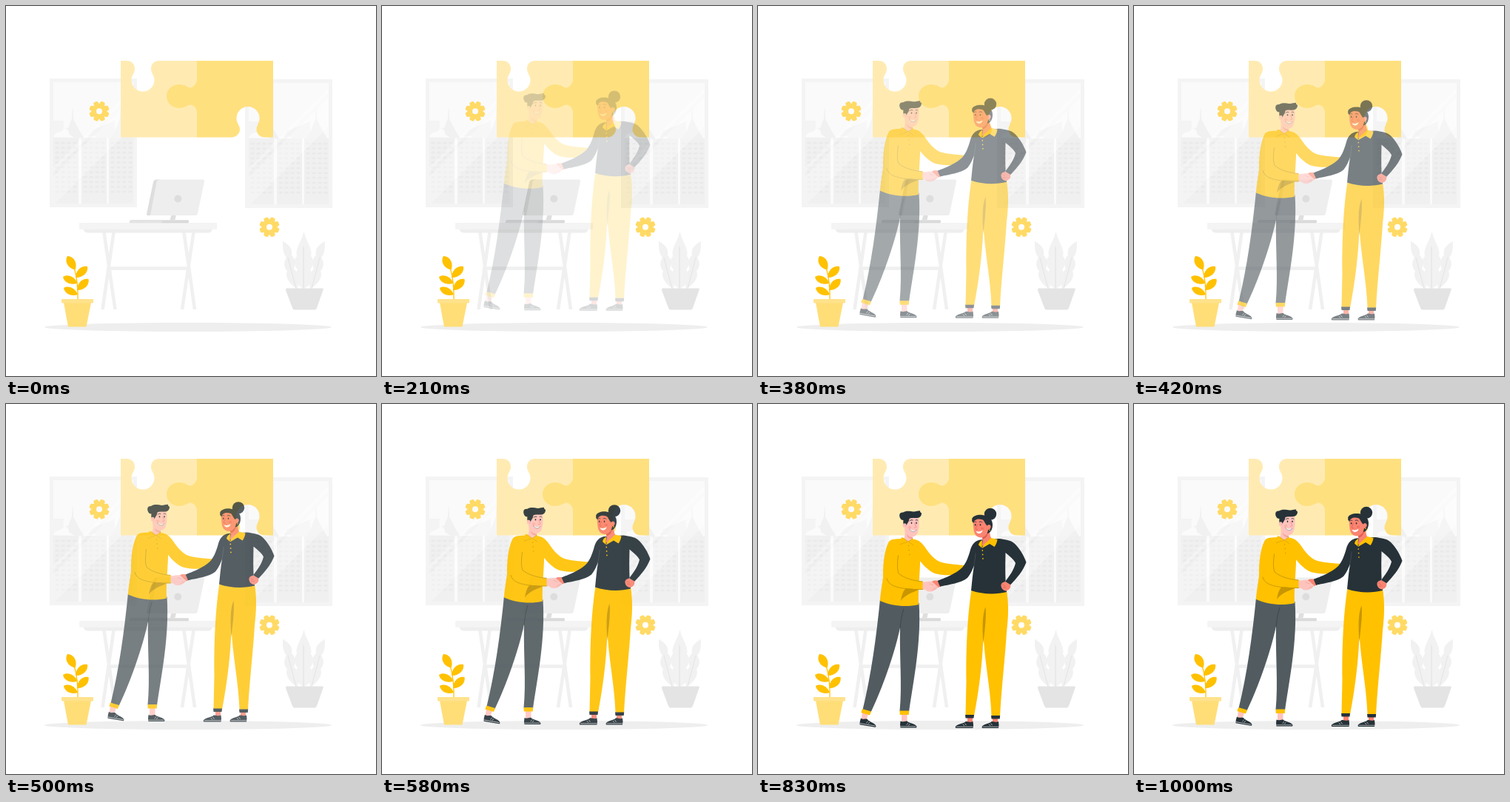
An HTML page with a canvas that plays this animation: 500 by 500 pixels, repeating every 1.04 s.

```html
<!DOCTYPE html>
<html lang="en">
<head>
<meta charset="utf-8">
<title>Handshake</title>
<style>
html, body { margin: 0; width: 100%; height: 100%; overflow: hidden; background: #fff; }
canvas { display: block; width: 500px; height: 500px; }
</style>
</head>
<body>
<canvas id="stage"></canvas>
<script>
const LOOP = 1040, STEP = 1000 / 24, LAG = 20, RISE = 30;
const AMBER = '#ffc100', SOFT = '#ffe07f', INK = '#263238', CREASE = '#c89600';
const MAN = '#ffc3bd', WOMAN = '#fa8471';
const ratio = window.devicePixelRatio || 1;

function surface(canvas) {
  canvas.width = canvas.height = 500 * ratio;
  const c = canvas.getContext('2d');
  c.scale(ratio, ratio);
  c.lineCap = c.lineJoin = 'round';
  return c;
}
const stage = surface(document.getElementById('stage'));
const scene = surface(document.createElement('canvas'));
const cast = surface(document.createElement('canvas'));

function fill(c, color, d) {
  c.fillStyle = color;
  c.fill(new Path2D(d), 'evenodd');
}
function line(c, color, width, d) {
  c.strokeStyle = color;
  c.lineWidth = width;
  c.stroke(new Path2D(d));
}
function oval(c, color, x, y, rx, ry = rx, turn = 0) {
  c.fillStyle = color;
  c.beginPath();
  c.ellipse(x, y, rx, ry, turn, 0, Math.PI * 2);
  c.fill();
}
function rect(c, color, x, y, w, h) {
  c.fillStyle = color;
  c.fillRect(x, y, w, h);
}

function cityWindow(c, dx, dy) {
  c.save();
  c.translate(dx, dy);
  rect(c, '#f4f4f4', 59, 98, 118, 174);
  rect(c, '#fafafa', 64, 103, 108, 164);
  c.beginPath();
  c.rect(64, 103, 108, 164);
  c.clip();
  fill(c, '#f4f4f4', 'M64 155H78V166C84 163 88 166 92 170L102 180H64ZM103 180C112 178 114 172 116 168L147 155V180Z');
  for (const x of [90, 155]) {
    fill(c, '#f1f1f1', `M${x - 14} 179L${x - 8} 170L${x - 1} 152L${x - .4} 139H${x + .4}L${x + 1} 152L${x + 9} 168L${x + 16} 179Z`);
  }
  fill(c, '#fbfbfb', 'M64 177C68 168 74 172 76 168C80 163 86 169 85 173L92 178ZM102 181C106 172 112 176 114 178C119 172 124 178 124 182Z');
  for (const x of [64, 102, 139]) {
    rect(c, '#f0f0f0', x, 178, 34, 90);
    for (let i = 0; i < 4; i++) {
      for (let y = 185; y < 254; y += 6.6) oval(c, '#eaeaea', x + 5 + i * 8, y, 2.9, 1.6);
    }
  }
  rect(c, '#fafafa', 98.5, 178, 3, 90);
  rect(c, '#fafafa', 136, 178, 3, 90);
  fill(c, 'rgba(255,255,255,.28)', 'M64 230L172 122V162L66 267H64ZM64 218L172 110V116L64 224Z');
  c.restore();
}

function gear(c, x, y) {
  c.save();
  c.translate(x, y);
  c.fillStyle = '#ffda66';
  c.beginPath();
  c.arc(0, 0, 10.2, 0, Math.PI * 2);
  c.arc(0, 0, 4, 0, Math.PI * 2, true);
  c.fill();
  c.rotate(Math.PI / 8);
  for (let i = 0; i < 8; i++) {
    fill(c, '#ffda66', 'M8.5 -4L12.5 -3.1Q13.6 -2.7 13.6 -1.6V1.6Q13.6 2.7 12.5 3.1L8.5 4Z');
    c.rotate(Math.PI / 4);
  }
  c.restore();
}

function leaf(c, x0, y0, x1, y1, w) {
  const dx = x1 - x0, dy = y1 - y0, n = Math.hypot(dx, dy);
  const px = -dy / n * w, py = dx / n * w;
  const side = s => [x0 + dx * .3 + px * s, y0 + dy * .3 + py * s, x0 + dx * .8 + px * s, y0 + dy * .8 + py * s];
  const a = side(1), b = side(-1);
  c.fillStyle = AMBER;
  c.beginPath();
  c.moveTo(x0, y0);
  c.bezierCurveTo(...a, x1, y1);
  c.bezierCurveTo(b[2], b[3], b[0], b[1], x0, y0);
  c.fill();
}

function pottedTwig(c) {
  line(c, AMBER, 1.2, 'M97 397C97.500 381 96 368 92.500 355');
  leaf(c, 93.500, 356.500, 83, 338, 7.500);
  leaf(c, 94, 367, 110, 352, 7);
  leaf(c, 96.500, 374.500, 77, 366, 6.500);
  leaf(c, 96, 384, 111.500, 369, 7);
  leaf(c, 97, 390, 78, 381, 6.500);
  fill(c, '#ffde78', 'M78 401H115L108.500 433.500H84Z');
  fill(c, '#ffe28c', 'M76 396H117Q118 396 118 397V400.500Q118 401.500 117 401.500H76Q75 401.500 75 400.500V397Q75 396 76 396Z');
}

function mirrored(c, draw) {
  for (const s of [1, -1]) {
    c.save();
    c.translate(402.500, 0);
    c.scale(s, 1);
    c.translate(-402.500, 0);
    draw();
    c.restore();
  }
}

function greyPlant(c) {
  mirrored(c, () => {
    fill(c, '#f1f1f1', 'M394 382C386 378 376 368 380 358C374 352 376 344 379 340C374 334 374 326 374 318C382 322 388 328 386 337C392 342 391 350 389 355C396 362 396 372 394 382Z');
    fill(c, '#f2f2f2', 'M403 382C388 376 390 362 394 356C388 350 389 342 393 338C390 328 400 318 402 306H403Z');
    line(c, '#e2e2e2', .9, 'M381 340C385 354 388 368 392 382');
  });
  line(c, '#dedede', .9, 'M402 326V382');
  fill(c, '#e4e4e4', 'M379.500 381.500H427.500Q429.500 381.500 428.500 384L420 408Q419 410.500 417 410.500H390Q388 410.500 387 408L378 384Q377.500 381.500 379.500 381.500Z');
}

function desk(c) {
  line(c, '#f0f0f0', 4.600, 'M140 354.500H247');
  c.lineCap = 'butt';
  line(c, '#f0f0f0', 4.600, 'M132.500 306L147.500 410M145.500 306L130.500 410M240.500 306L255 410M253.500 306L238 410');
  c.lineCap = 'round';
  fill(c, '#eeeeee', 'M104 301H279Q278 306.500 273 306.500H111Q106 306.500 104 301Z');
  rect(c, '#f4f4f4', 99, 293, 186, 8.700);
  fill(c, '#dfdfdf', 'M223.500 282H230L228 291H221Z');
  fill(c, '#e3e3e3', 'M169 289H246Q248 291 246 293.300H167Q166 290 169 289Z');
  fill(c, '#dadada', 'M212 290H246Q248 291 246 293.300H210Z');
  fill(c, '#dedede', 'M203 234.500H208L198 283H191.500Q189.500 283 190 281L199 238Q200 234.500 203 234.500Z');
  fill(c, '#eeeeee', 'M207 234.500H266Q268.500 234.500 268 237L259 280Q258.300 283 256 283H195L203.500 238Q204.300 234.500 207 234.500Z');
  oval(c, '#dddddd', 232.300, 260.500, 5);
}

function puzzle(c) {
  const tab = 'C258 105 252 113 245.500 109.500C240 105.500 234 105.700 231 106.300C223 107.500 217 114 217 122C217 130 223 136.500 231 137.700C236 138.200 241 137.500 245.500 134.500C252 131 258 138 258 144';
  fill(c, '#ffebb2', 'M155 74H163C171 74 174.500 80 174 86C173.500 91 169.500 94 169.500 100A15.500 15.500 0 0 0 200.500 100C200.500 94 196.500 91 196 86C195.500 80 199 74 207 74H258V177.500H155Z');
  fill(c, SOFT, 'M258 74H361V177.500H350C342 177.500 338 171 338.500 166C339 161 342.500 158 342.500 151.500A15.500 15.500 0 0 0 311.500 151.500C311.500 158 315.500 161 316 166C316.500 171 312 177.500 304 177.500H258V144'
    + 'C258 138 252 131 245.500 134.500C241 137.500 236 138.200 231 137.700C223 136.500 217 130 217 122C217 114 223 107.500 231 106.300C234 105.700 240 105.500 245.500 109.500C252 113 258 105 258 99Z');
}

function drawScene(c) {
  rect(c, '#fff', 0, 0, 500, 500);
  cityWindow(c, 0, 0);
  cityWindow(c, 264, 1);
  puzzle(c);
  gear(c, 126, 142.300);
  gear(c, 356, 298.700);
  desk(c);
  oval(c, '#eeeeee', 246, 434, 194, 6);
  pottedTwig(c);
  greyPlant(c);
}

function shoe(c, x, y, flip, turn) {
  c.save();
  c.translate(x, y);
  c.rotate(turn);
  c.scale(flip, 1);
  fill(c, INK, 'M0 -9C3 -7 6 -9.500 9 -9C12 -5.500 21.500 -5.500 22 -1.500Q22 0 21 0H0Q-1 -4 0 -9Z');
  line(c, '#fff', .6, 'M.5 -1.700H20.500M10 -6L8.500 -4M12.500 -5L11 -3.200');
  c.restore();
}

function manBody(c) {
  // far arm
  fill(c, AMBER, 'M211 181C218 182 222 186 226 192C232 201 239 209 248 212C260 215 270 215 280 216L275 228C262 230 249 230 239 227C229 223 221 213 214 204Z');
  fill(c, MAN, 'M141 414L149 417L146 426L139.500 425ZM194 416H201.500V428H194Z');
  shoe(c, 137.500, 431.300, 1, .17);
  shoe(c, 192.500, 435.500, 1, 0);
  fill(c, '#525c60', 'M165 262C160 312 153 364 141.500 411L152.500 414.500C167 385 185 335 192 300C191 340 195 378 191.500 413L204 414C210 372 221 320 217.500 267Z');
  line(c, '#384347', .8, 'M192 301C193 292 194 283 197 275');
  fill(c, AMBER, 'M141 410L153 413.500L151 418.500L139.300 415ZM191.500 412.500H204.200L203.800 418H191.700Z');
  // torso
  fill(c, AMBER, 'M193 180C187 180.500 180 180 177 184C172 192 171 211 169 232C167 247 165 257 165 264C180 271 201 273 217 269C216 244 220 222 219 198C219 187 217 182 211 181Z');
  fill(c, MAN, 'M198 166L209 176V182C208 186 200 186 196.500 181C199 177 199 172 198 166Z');
  fill(c, '#f2a39b', 'M201 174C204 178 207 178 209 178V180C204 181 201 177 201 174Z');
  fill(c, AMBER, 'M194.500 178C192 181 191 184 191.500 188L203 184L196.500 179ZM209 179.500L203 184L210.500 189C212 185 211.500 182 209 179.500Z');
  line(c, CREASE, .5, 'M196.500 179.500L203 184L209 180M192 187.700L203 184L210 188.700');
}

function manHead(c) {
  fill(c, MAN, 'M199 151C203 148 214 148 217 152C218 158 218 165 216 171C214.500 177 208 179 203.500 176C200 173.500 198.500 169 198 164Z');
  fill(c, INK, 'M192 152C190 147 192 144 196 144.500C200 141.500 206 143 210 143.500C214 143.500 217 142 219 142.500C219 144 219.500 144.500 221 145.500C221 149 219 152 215 152C211 152.500 207 151.500 204.500 153C204 157 202.500 158 201.500 160L199.500 165C196 162 196 157 196.500 155Q193 155 192 152Z');
  oval(c, MAN, 198.300, 162.500, 2.600, 3.200, -.3);
  line(c, '#e79a92', .5, 'M197 161C199 161 200 162.500 199.800 164');
  oval(c, INK, 207.500, 158.800, .8, 1.200);
  oval(c, INK, 214, 158.800, .8, 1.200);
  line(c, INK, .9, 'M205 156C206 154.700 207.500 154.500 209 155M213 155C214 154.400 215.300 154.600 216 155.500');
  line(c, '#ef8178', .7, 'M211.500 159L214 164.500C213 165.300 212 165.200 211.300 165');
  fill(c, '#fff', 'M204.500 167C207.500 169 211 169.200 213.800 168C212.500 171.500 206.500 172 204.500 167Z');
  line(c, INK, .4, 'M204.500 167C207 171.600 212 171.700 213.800 168');
  oval(c, 'rgba(240,110,100,.25)', 205, 164.500, 2.200, 1.600);
}

function manArm(c) {
  fill(c, AMBER, 'M178 183C170 194 169 217 169 230C170 239 174 243 182 245C196 249 211 249 223 248.500V238C211 236.500 197 234 190 227C188 215 192 200 190 192Z');
  line(c, CREASE, .9, 'M189.500 203C188.500 212 187.500 220 190 227C198 234 211 237 222 238');
  line(c, CREASE, .9, 'M174 234C176 243 187 246 199 247.500C207 248.600 215 248.700 223 248.500');
  fill(c, CREASE, 'M199 248C204 247 210 248 217 249C212 251.500 199 255 193 264C194 257 196 251 199 248Z');
  for (let i = 0; i < 3; i++) oval(c, CREASE, 203.500 + i * .6, 189.500 + i * 6, .7);
}

function womanBody(c) {
  fill(c, WOMAN, 'M283 422H290V430H283ZM317 422H324V430H317Z');
  shoe(c, 290.500, 436, -1.080, 0);
  shoe(c, 325, 436, -1.020, 0);
  fill(c, AMBER, 'M288.500 249C283 283 281 330 281.500 372L280.500 418.500L292 419.500C298 389 304 345 304.500 308C306 346 314 380 315.500 419L327 420C329 382 334 340 336 306C338.500 286 339 268 336 250Z');
  fill(c, CREASE, 'M307.500 272C303 284 303 298 304.500 322C306 305 309 288 307.500 272Z');
  fill(c, INK, 'M280 418H292L291.500 422.500H280.500ZM315 419H327.200L326.700 423.500H315.500Z');
  fill(c, INK, 'M300 181.500C293 183 289 188 287 195C284 206 281 213 276 219C266 228 255 232 243 237L246 244.500C259 242 274 240 283 233C288 227 290 221 292 216C290 228 289 240 288 250C302 255 321 256 336 252C334 237 334 221 334.500 199C340 204 346 208 348 213C346 222 340 230 334 238L341 242.500C350 233 358 224 362.500 212C360 204 353 192 346 186C341 181.500 332 181 326 180Z');
  line(c, '#48545a', .7, 'M292 216C293 209 294 204 294 200');
  fill(c, WOMAN, 'M334 238C330 239 328 241 328.500 244C329 248 332 250.500 336 250.500C340 249 342 246 341 242Z');
  line(c, '#c8594e', .5, 'M330 242L334 244M331 246L335 246');
  fill(c, WOMAN, 'M302 170L313 163C313 171 313 177 316.500 181C314 187 307 190 302.500 190C304 184 304 178 302 170Z');
  fill(c, '#de5f52', 'M302.500 176C307 176 310 173 311 170C311 177 307 180 303.500 181Z');
  fill(c, AMBER, 'M303 182C300 183.500 298.500 185.500 298 188.500L302.500 192.500ZM315 179L323.500 181C323 185 321.500 188.500 319.500 191L313 187L302.700 193C305 186 311 184 315 179Z');
  for (let i = 0; i < 3; i++) oval(c, AMBER, 303.300 + i * .3, 196 + i * 5.500, .85);
}

function womanHead(c) {
  oval(c, INK, 314, 146.800, 8.200, 8);
  fill(c, INK, 'M289 154C290 149 297 147.500 303 148C311 149 317 153 317 161C317 168 314 172 310 173L299 160Z');
  fill(c, WOMAN, 'M291 155C294 151 302 151 306 154C308 158 309 161 311 163C312 170 309 177 302 178.500C296 178.500 292.500 175 291.500 168C291 163 290.500 159 291 155Z');
  fill(c, INK, 'M289 156C290 150 297 148 303 150C308 152 311 157 312.500 164C308 163 307 158 304 154.500C298 152.500 293 153 291 159Z');
  oval(c, WOMAN, 311.800, 164.500, 2.700, 3.400, .3);
  oval(c, AMBER, 313, 168.500, .8);
  oval(c, INK, 293.700, 161.300, .8, 1.200);
  oval(c, INK, 300.500, 161.300, .8, 1.200);
  line(c, INK, .8, 'M292 158C293 157 294 156.900 295 157.500M299 157.500C300.500 156.500 302 157 303 158');
  line(c, '#d65a4f', .7, 'M296.500 161C295.500 164 294 166 294.200 167C295 167.800 296 167.700 296.800 167.500');
  fill(c, '#fff', 'M294.500 170C298 171 301 170.500 303.500 168.500C303 173.500 297 175 294.500 170Z');
  oval(c, 'rgba(222,70,60,.3)', 303, 166, 2, 1.500);
}

function hands(c) {
  fill(c, '#d96a5c', 'M247 237.500L239 237C235 237 233.500 239 234.500 241L240 247L247 244.500Z');
  fill(c, MAN, 'M222.500 239C227 238.500 231 237.500 235 238C238.500 239 241.500 241 243.500 243.500C244 246.500 241 248.500 238 250C234 252.300 230 252 227 250C225.500 248.500 224 248 222.500 248Z');
  fill(c, WOMAN, 'M246 237C242 236.500 237 236 235.500 238C236.500 240 239 240.500 240.500 243L243.500 245L247 244.500Z');
  line(c, '#e79a92', .6, 'M232 241L237 243M236 249.500L239 246M239 248.700L241.500 245.700');
  fill(c, INK, 'M242.700 237L249 234.500L252 243L246 244.700Z');
}

function drawCast(c, y) {
  c.clearRect(0, 0, 500, 500);
  c.save();
  c.translate(0, y);
  manBody(c);
  manHead(c);
  manArm(c);
  womanBody(c);
  womanHead(c);
  hands(c);
  c.restore();
}

// cubic-bezier(.36, -.01, .5, 1.38)
function ease(t) {
  if (t >= 1) return 1;
  const curve = (s, a, b) => 3 * (1 - s) * (1 - s) * s * a + 3 * (1 - s) * s * s * b + s * s * s;
  let lo = 0, hi = 1;
  for (let i = 0; i < 24; i++) {
    const mid = (lo + hi) / 2;
    if (curve(mid, .36, .5) < t) lo = mid; else hi = mid;
  }
  return curve(lo, -.01, 1.38);
}

function render(ms) {
  const step = Math.floor((ms % LOOP + 5) / STEP) % 25;
  const p = step < 2 ? 0 : ease((step * STEP + LAG) / 1000);
  stage.globalAlpha = 1;
  stage.drawImage(scene.canvas, 0, 0, 500, 500);
  if (p <= 0) return;
  drawCast(cast, (p - 1) * RISE);
  stage.globalAlpha = Math.min(p, 1);
  stage.drawImage(cast.canvas, 0, 0, 500, 500);
}

drawScene(scene);
const start = performance.now();
function tick() {
  render(performance.now() - start);
  requestAnimationFrame(tick);
}
tick();
</script>
</body>
</html>
```
